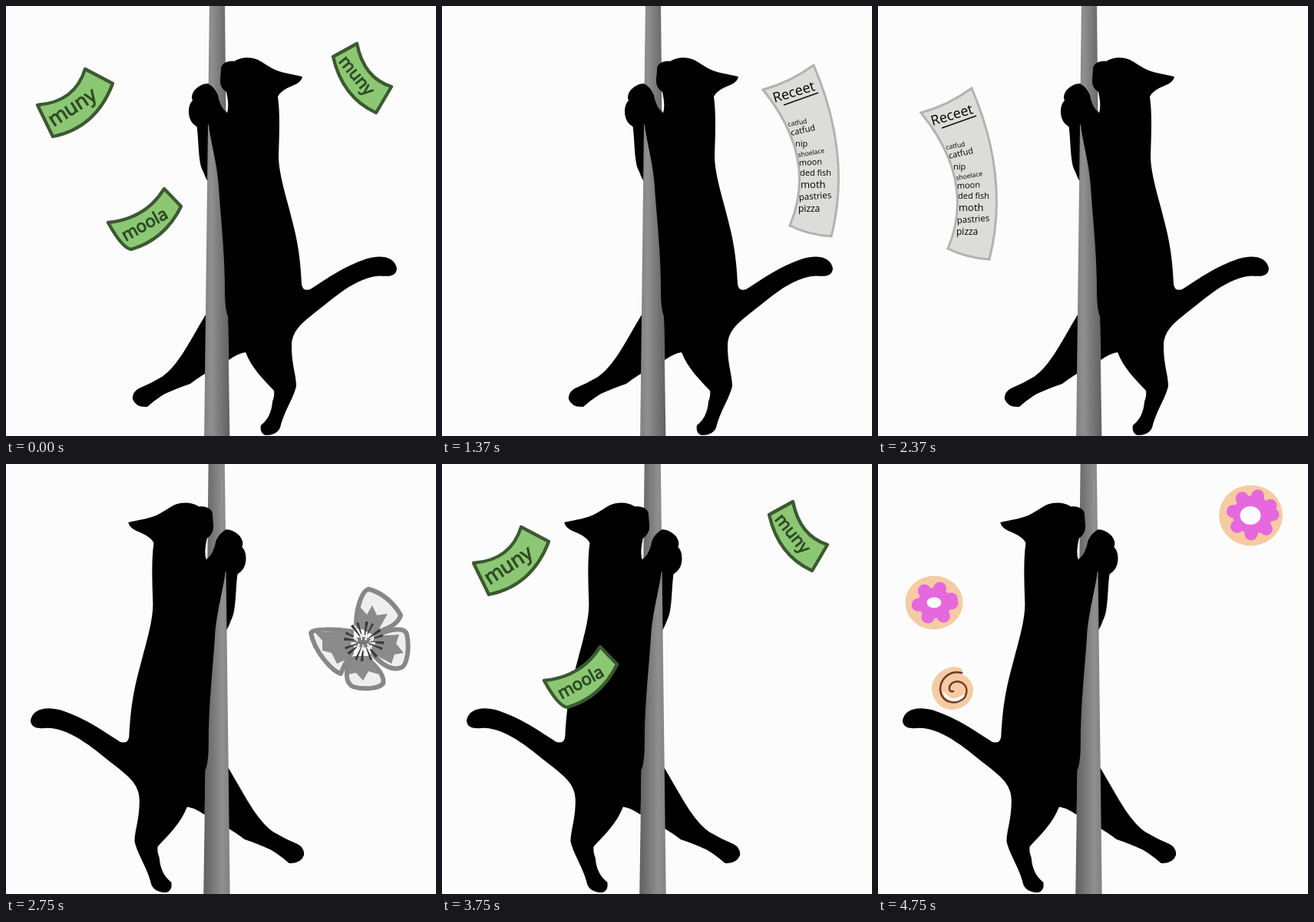
These frames come from a looping animation (560x560 px, 5 s). An HTML page:

```html
<!DOCTYPE html>
<html lang="en">
<head>
<meta charset="utf-8">
<title>Pole cat</title>
<style>
  html, body { margin: 0; width: 100%; height: 100%; overflow: hidden; background: #fcfcfc; }
  svg { display: block; width: 100%; height: 100%; }
  text { font-family: "Open Sans", "Noto Sans", sans-serif; }
  #items > g { display: none; }
  #money path { fill: #8cc873; stroke: #3b5931; stroke-width: 4.3; stroke-linejoin: round; }
  #money text { fill: #2e4a27; stroke: #2e4a27; stroke-width: 1.1; text-anchor: middle; }
  #can path { stroke: #000; stroke-width: 3.4; stroke-linejoin: round; stroke-linecap: round; }
  #lace path, #roll path { fill: none; stroke-linecap: round; }
  #lace .cut { stroke-linecap: butt; }
  #moth .wing { fill: #eee; stroke: #878787; stroke-width: 6; stroke-linejoin: round; }
  #moth .shade { fill: #8b8b8b; }
  .icing { fill: #e569dc; stroke: #e569dc; stroke-width: 17; stroke-linecap: round; stroke-dasharray: 0 21; }
  .dough, #roll .dough { fill: #f6cba3; }
  .hole { fill: #fcfcfc; }
</style>
</head>
<body>
<svg viewBox="0 0 560 560">
  <defs>
    <linearGradient id="metal">
      <stop offset="0" stop-color="#828282"/>
      <stop offset=".3" stop-color="#8f8f8f"/>
      <stop offset=".65" stop-color="#777"/>
      <stop offset="1" stop-color="#606060"/>
    </linearGradient>
  </defs>

  <g id="dancer">
    <!-- far arm and far leg, behind the pole -->
    <path d="M247 148C252 170 249 203 257 216Q260 225 264 230L267 150Z"/>
    <path d="M263 397C240 435 225 468 203 483Q188 492 173 498Q164 503 165 512Q169 523 184 522Q195 512 207 505Q225 497 240 492Q250 484 264 476Z"/>
    <path d="M265 -5H285L289 400L291.500 570H258L260 400Z" fill="url(#metal)"/>
    <path d="M280 84C279 75 288 71 297 72C306 66.500 318 65.500 329 70.500C342 78 350 85 365 87.500Q378 90 386 92Q385 99 375 103Q357 110 354 118C357 140 356 165 355 195C355 222 368 257 377 297C383 325 384 345 385 362Q386 372 396 369
      C418 355 440 339 470 329C488 324 506 326 509 342C508 353 498 352 487 351.500C455 353 425 382 404 398C385 413 372 423 372 443C372 468 378 480 378 495C374 512 362 528 357 549Q353 559 338 559Q330 556 332 546C340 540 346 530 347 515Q350 508 349 501C336 487 320 472 312 451Q303 452 290 461
      L289 404Q285 395 285 370C285 320 279 270 277 235C275 205 266 175 264 155L262 153L250 158Q238 152 238 137Q238 128 243 123Q240 117 246 109Q254 101 263 101Q272 106 276 116Q277 124 282 133L288 139Q291 130 287 112Q278 106 279 95Z"/>
  </g>

  <g id="items">
    <g id="money">
      <path d="M41 129Q90 125 103 82L139 101Q117 159 61 170Z"/>
      <text font-size="26" transform="translate(91 139) rotate(-33)">muny</text>
      <path d="M133 282Q182 277 206 238L228 261Q207 304 163 317Q151 315 133 282Z"/>
      <text font-size="22" transform="translate(184 291) rotate(-29)">moola</text>
      <path d="M426 66L457 49Q466 94 502 105L482 139Q438 119 426 66Z"/>
      <text font-size="22" transform="translate(451 95) rotate(51)">muny</text>
    </g>

    <g id="can">
      <path d="M416 180L414 228Q468 249 521 234L524 188Q470 210 416 180Z" fill="#7f6a9a"/>
      <path d="M416 180Q468 173 524 188Q470 210 416 180Z" fill="#8f908e"/>
      <path d="M469 196Q466 186 472 185Q479 186 477 196" fill="none"/>
      <text font-size="14.500" transform="translate(427 206) rotate(5)">Turkey</text>
      <text font-size="15" x="490" y="213">n</text>
      <rect x="421" y="212" width="45" height="20" rx="5" fill="#fbe136"/>
      <text font-size="11" font-weight="700" fill="#e03a22" transform="translate(422 224) rotate(4)">nommys</text>
      <text font-size="15.500" transform="translate(472 234) rotate(-7)">chees</text>
    </g>

    <g id="lace">
      <path class="cut" d="M495 41C470 50 422 80 421 118C421 175 470 160 495 188C512 208 518 225 498 238C465 255 396 275 396 312C400 335 410 358 440 359C480 357 497 362 503 382C503 408 464 440 467 463" stroke="#6a1f96" stroke-width="14"/>
      <path class="cut" d="M424 122Q423 150 440 161M502 236Q482 249 460 251M401 328Q408 350 428 355M490 412Q472 438 468 456" stroke="#e9dcf1" stroke-width="5" stroke-dasharray="1 4"/>
      <path d="M501 38L515 32" stroke="#8b7f9b" stroke-width="10"/>
      <path d="M502 38L511 34" stroke="#eee" stroke-width="2"/>
      <path d="M467 465L466 486Q467 491 469 488" stroke="#8b7f9b" stroke-width="4.500"/>
    </g>

    <g id="receipt">
      <path d="M56 139Q92 129 122 107Q172 224 145 330Q115 328 91 316Q128 228 56 139Z" fill="#dcdcdb" stroke="#b2b2b0" stroke-width="3"/>
      <path d="M83 159L128 143" stroke="#111" stroke-width="1.500"/>
      <text font-size="18" transform="translate(71 156) rotate(-17)">Receet</text>
    </g>

    <g id="moth">
      <path class="wing" d="M456 208C456 192 462 166 472 163C490 167 506 182 514 197C510 210 495 215 480 220Z"/>
      <path class="wing" d="M482 224C500 214 520 212 522 222C526 240 522 262 515 265C502 270 490 262 478 248Z"/>
      <path class="wing" d="M450 254C441 270 442 285 452 290C465 294 485 293 491 286C494 275 480 262 472 254Z"/>
      <path class="wing" d="M450 218C430 215 398 214 397 220C402 245 425 270 436 273Q442 258 450 246Z"/>
      <path class="shade" d="M456 214L461 186L470 196L477 184L483 197L497 195L484 218ZM480 224L512 222L508 234L518 246L506 248L502 260L480 248ZM452 250L445 274L456 272L465 282L472 270L486 274L474 250ZM452 218L402 219L412 230L412 243L424 246L431 260L440 256L452 244Z"/>
      <circle cx="466" cy="231" r="17" fill="none" stroke="#383838" stroke-width="18" stroke-dasharray="2.500 3 2 6"/>
      <ellipse cx="465" cy="232" rx="12" ry="7" fill="#777" stroke="#eee" stroke-width="8" stroke-dasharray="2 4 3 5"/>
    </g>

    <g id="pastries">
      <ellipse class="dough" cx="485.500" cy="67" rx="41.500" ry="39.500"/>
      <ellipse class="icing" cx="488" cy="66" rx="26" ry="25"/>
      <ellipse class="hole" cx="485" cy="67" rx="13.500" ry="12"/>
      <ellipse class="dough" cx="73" cy="180.500" rx="37.500" ry="35"/>
      <ellipse class="icing" cx="74" cy="181" rx="22" ry="20"/>
      <ellipse class="hole" cx="73" cy="180.500" rx="9.500" ry="7"/>
      <g id="roll">
        <path class="dough" d="M110 274Q112 264 99 264C82 266 70 278 70 294C72 310 83 320 97 320C114 319 125 307 124 291Q121 279 110 274Z"/>
        <path d="M86 299Q97 313 111 302" stroke="#fcfcfc" stroke-width="3.500"/>
        <path d="M109 272C93 268 81 280 81 294C83 312 103 315 113 304C121 290 108 279 97 285C90 291 93 298 98 296" stroke="#6b3a2b" stroke-width="2.500"/>
      </g>
    </g>
  </g>
</svg>

<script>
const byId = id => document.getElementById(id);
const LOOP = 5000, BEAT = 500;
const FLIPPED = "matrix(-1.035 0 0 1.032 558.8 -18.9)";

// text, left, baseline, size, tilt
const groceries = [
  ["catfud", 89, 187, 8.5, -10], ["catfud", 93, 199, 11, -13], ["nip", 98, 213, 11, 0],
  ["shoelace", 102, 227, 8.5, -10], ["moon", 103, 238, 11, -3], ["ded fish", 104, 251, 11, 0],
  ["moth", 105, 267, 13, 0], ["pastries", 103, 283, 11.5, -4], ["pizza", 102, 298, 12, 0]
];
for (const [word, x, y, size, tilt] of groceries) {
  const line = document.createElementNS("http://www.w3.org/2000/svg", "text");
  line.textContent = word;
  line.setAttribute("font-size", size);
  line.setAttribute("transform", `translate(${x} ${y}) rotate(${tilt})`);
  byId("receipt").append(line);
}

// start time, item, shift
const schedule = [
  [0, "money", 0, 0], [370, "can", -352, -126], [750, "can", 0, 0],
  [1000, "moth", -378, 0], [1370, "receipt", 362, -30], [1750, "lace", 0, 0],
  [2000, "can", -385, 0], [2370, "receipt", 0, 0], [2750, "moth", 0, 0],
  [3000, "can", 0, 0], [3370, "moth", -6, 0], [3750, "money", 0, 0],
  [4000, "receipt", 0, 0], [4370, "can", 0, 0], [4750, "pastries", 0, 0]
];
let shown;

function draw() {
  const time = performance.now() % LOOP;
  const flipped = Math.floor(time / BEAT) % 2;
  byId("dancer").setAttribute("transform", flipped ? FLIPPED : "");

  const [, name, dx, dy] = schedule.findLast(([start]) => start <= time);
  const item = byId(name);
  if (shown) shown.style.display = "none";
  item.style.display = "inline";
  item.setAttribute("transform", `translate(${dx} ${dy})`);
  shown = item;
  requestAnimationFrame(draw);
}
draw();
</script>
</body>
</html>
```
